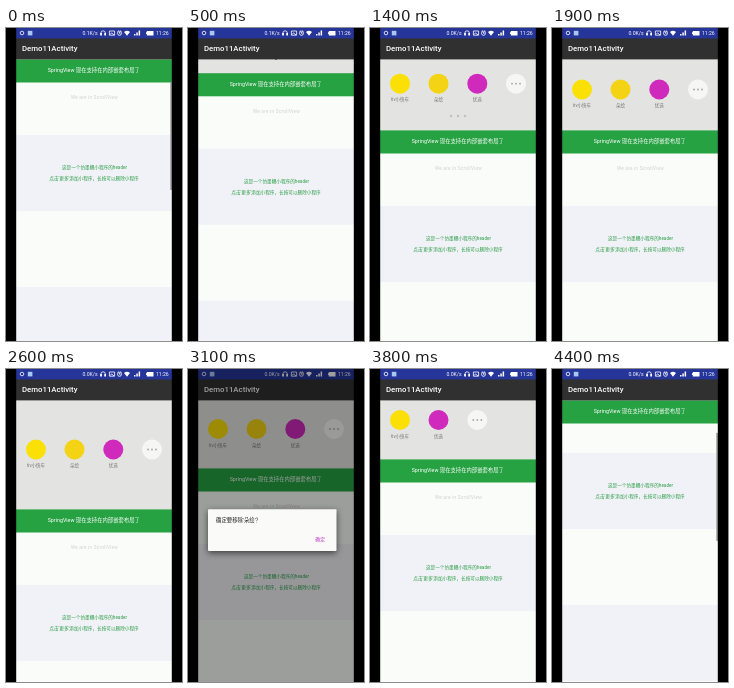
An HTML page that plays this animation: 176x313 px, repeating every 4.5 s.

```html
<!DOCTYPE html>
<html lang="zh-CN">
<head>
<meta charset="utf-8">
<style>
html, body { margin: 0; width: 100%; height: 100%; overflow: hidden; background: #000; }
svg { display: block; width: 100vw; height: 100vh; font-family: Roboto, "Noto Sans CJK SC", "Noto Sans CJK", sans-serif; }
.mid { text-anchor: middle; }
.line { fill: none; stroke: #fff; stroke-width: .8; }
.card { filter: drop-shadow(0 2px 3px #0009); }
</style>
</head>
<body>
<svg viewBox="0 0 176 313">
  <rect x="10" width="156" height="313" fill="#f1f2f7"/>
  <g id="content">
    <path d="M10 0h156v107H10zM10 183h156v76H10zM10 335h156v76H10z" fill="#fafcf9"/>
    <text class="mid" x="88.5" y="70.8" font-size="4.7" letter-spacing=".25" fill="#ced1cd">We are in ScrollView</text>
    <g class="mid" font-size="4.63" fill="#2b9c46">
      <text x="88.5" y="141.3">这是一个仿墨鲤小程序的header</text>
      <text x="88" y="152.3">点击'更多'添加小程序，长按可以删除小程序</text>
    </g>
  </g>

  <rect id="header" x="10" y="31" width="156" fill="#e3e4e2"/>
  <g id="apps" class="mid" font-size="4.5" fill="#777">
    <g transform="translate(30)"><circle cy="-16" r="10" fill="#fbe005"/><text y="1.7">tiv小快车</text></g>
    <g id="second" transform="translate(68.5)"><circle cy="-16" r="10" fill="#f3d313"/><text y="1.7">朵绘</text></g>
    <g id="third"><circle cy="-16" r="10" fill="#cf2abb"/><text y="1.7">优选</text></g>
    <g id="more">
      <circle cy="-16" r="10" fill="#f6f6f4"/>
      <path d="M-4-16h.01M0-16h.01M4-16h.01" stroke="#aaa" stroke-width="1.9" stroke-linecap="round"/>
    </g>
  </g>
  <g id="dots" fill="#777"><circle/><circle/><circle/></g>

  <g id="banner">
    <rect x="10" y=".4" width="156" height="23.1" fill="#27a243"/>
    <text class="mid" x="87.8" y="13" font-size="5.35" fill="#fff">SpringView 现在支持在内部嵌套布局了</text>
  </g>
  <rect id="bar" x="164.3" width="1.7" height="108" fill="#999"/>

  <rect x="10" y="10" width="156" height="21.4" fill="#303030"/>
  <text x="16" y="23.3" font-size="7.8" font-weight="500" fill="#fff">Demo11Activity</text>
  <rect x="10" width="156" height="10.4" fill="#26359a"/>
  <g fill="#fff">
    <circle cx="16" cy="5" r="1.8" class="line"/>
    <rect x="21.8" y="2.8" width="4.6" height="4.6" fill="#a9c8f0"/>
    <text id="speed" x="76.4" y="7" font-size="5.2"></text>
    <path class="line" d="M94.9 7V5a2.2 2.2 0 0 1 4.4 0v2"/>
    <path d="M94.2 5h1.7v2.6h-1.7zM98.3 5h1.7v2.6h-1.7z"/>
    <path class="line" d="M103.4 3h5.2v4.2h-5.2zM104 6.6l1.5-1.7 2.5 2"/>
    <path class="line" d="M111.5 3.4l1-.9M115.5 3.4l-1-.9M113.5 4v1.4h1"/>
    <circle class="line" cx="113.5" cy="5.3" r="2"/>
    <path d="M118 3.9q3-2.4 6 0l-3 3.8z"/>
    <path d="M128 7.5h1.5V6H128zM130.3 7.5h1.5v-3h-1.5zM132.6 7.5h1.5V2.6h-1.5z"/>
    <path d="M140.8 3h6.7v4.4h-6.7zM140 4.2h.8V6h-.8z"/>
    <text x="150" y="7" font-size="5.1">11:26</text>
  </g>

  <rect id="dim" x="10" width="156" height="313"/>
  <g id="dialog">
    <rect class="card" x="20" y="140.3" width="128.5" height="41.7" rx="1" fill="#fafbf8"/>
    <text x="28" y="152.6" font-size="5.4" fill="#222">确定要移除'朵绘'？</text>
    <text class="mid" x="132.2" y="172.2" font-size="4.9" font-weight="500" fill="#c03cc6">确定</text>
  </g>
  <path d="M0 0h10.2v313H0zM165.8 0H176v313h-10.2z"/>
</svg>
<script>
const $ = id => document.getElementById(id);
const set = (el, attrs) => { for (const k in attrs) el.setAttribute(k, attrs[k]); };
const move = (id, x, y) => set($(id), { transform: `translate(${x} ${y})` });
const ramp = (v, a, b) => Math.min(1, Math.max(0, (v - a) / (b - a)));

// [ms, pull distance]; negative values scroll the page
const pulls = [[0, 0], [100, 1], [600, 17], [900, 48], [1200, 51], [1500, 81], [1900, 71],
  [2100, 68], [2300, 68], [2400, 79], [2600, 109], [2900, 70], [3000, 68], [3600, 68],
  [3700, 66], [3800, 59], [4000, 4], [4100, 0], [4200, -11], [4400, -23], [4500, -23]];

function pullAt(t) {
  const i = pulls.findIndex(p => p[0] > t);
  const [a, from] = pulls[i - 1], [b, to] = pulls[i];
  return from + (to - from) * ramp(t, a, b);
}

function draw(t) {
  const pull = pullAt(t), open = Math.max(0, pull), edge = 31 + open;
  move('content', 0, pull);
  move('banner', 0, edge);
  set($('header'), { height: open + 1 });

  // icons drop into place once opened, then stay centred when overpulled
  const drop = ramp(t, 1200, 1500);
  const lift = 19 * (1 - drop) + Math.max(0, (open - 68) / 2) * drop;
  move('apps', 0, edge - 23 - lift);
  const removed = t >= 3500;
  set($('second'), { opacity: removed ? 0 : 1 });
  move('third', removed ? 68.5 : 107.3, 0);
  move('more', removed ? 107.3 : 146, 0);

  const spread = 7 * ramp(open, 22, 46);
  [...$('dots').children].forEach((dot, i) =>
    set(dot, { cx: 88 + (i - 1) * spread, cy: edge - 14, r: 1.2 }));
  set($('dots'), { opacity: t < 2000 ? 1 - drop : 0 });

  set($('bar'), { y: 54 - Math.min(0, pull) * .43, opacity: t > 4100 ? 1 : 1 - ramp(t, 0, 400) });
  $('speed').textContent = t < 600 ? '0.1K/s' : '0.0K/s';

  const shade = ramp(t, 3000, 3160) * (1 - ramp(t, 3450, 3600));
  set($('dim'), { opacity: .6 * shade });
  set($('dialog'), { opacity: Math.min(1, shade * 1.6) });
}

const start = performance.now();
function tick() {
  const t = (performance.now() - start) % 4500;
  draw(Math.floor(t / 100) * 100);
  requestAnimationFrame(tick);
}
tick();
</script>
</body>
</html>
```
